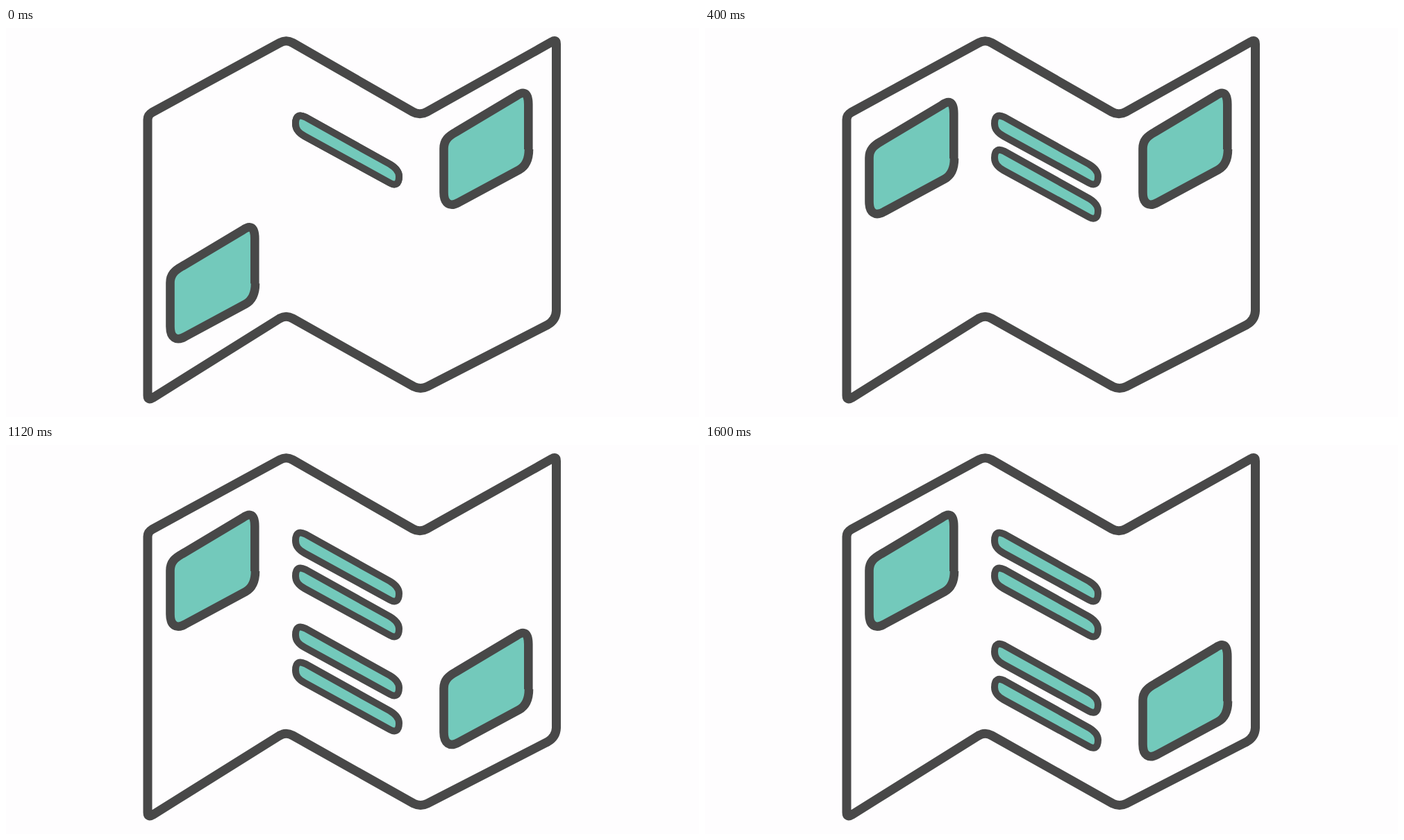
Recreate the animation shown at these times as an HTML page. Size 998 px wide and 561 px high, loop 2.04 s.

```html
<!DOCTYPE html>
<html lang="en">
<head>
<meta charset="utf-8">
<title>Folding leaflet</title>
<style>
  html, body { margin: 0; width: 100%; height: 100%; overflow: hidden; background: #fefdfe; }
  svg { display: block; width: 100vw; height: 100vh; }
</style>
</head>
<body>
<svg viewBox="0 0 998 561">
  <defs>
    <path id="card" stroke-width="12.6" d="M753 175C753 190 748 199.5 739 204.5L652 251.5C639 259 630.5 253 630.5 237V174C630.5 162 637 156 648 150L735 98C745 90.5 752.3 92 752.3 110V175"/>
    <path id="bar" stroke-width="10" d="M417 138C417 126 423 124.5 431 128.5L553 196.5C562 202 566 207 566 214C566 226 560 227.5 553 223.5L430 156C421 151 417 146 417 138Z"/>
  </defs>
  <path fill="none" stroke="#484848" stroke-width="13" d="M204 132Q204 125.5 210 122L394 21.5Q403.5 16 413 21.5L586 121Q596 126.5 606 121L786 20Q792.5 16 792.5 23V408Q792 421 780 428L607 517Q597 522 587 517L413 419Q403.5 413.5 394 419L212 533Q204 538 204 530Z"/>
  <g fill="#73c9bb" stroke="#484848">
    <use id="left" href="#card"/>
    <use id="right" href="#card"/>
    <g id="pair"><use class="second" href="#bar"/><use href="#bar"/></g>
    <use class="second" href="#bar"/>
    <use href="#bar"/>
  </g>
</svg>
<script>
const LOOP = 2040, STEP = 40;
const left = document.getElementById('left');
const right = document.getElementById('right');
const pair = document.getElementById('pair');
const seconds = document.querySelectorAll('.second');

// Timing curve cubic-bezier(1/3, 0, b, 1), solved by bisection.
function ease(x, b = 0) {
  if (x <= 0) return 0;
  if (x >= 1) return 1;
  let lo = 0, hi = 1;
  for (let i = 0; i < 30; i++) {
    const s = (lo + hi) / 2, r = 1 - s;
    if (s * r * r + 3 * b * s * s * r + s ** 3 < x) lo = s; else hi = s;
  }
  return lo * lo * (3 - 2 * lo);
}

const move = (t, start, span, from, to, b) =>
  from + (to - from) * ease((t - start) / span, b);

const place = (el, x, y) => el.setAttribute('transform', `translate(${x} ${y.toFixed(3)})`);

function draw(t) {
  place(left, -394, move(t, 0, 560, 193.5, 7));
  place(right, 0, move(t, 800, 560, 0, 194.5));
  const gap = move(t, 0, 560, 0, 51);
  seconds.forEach(el => place(el, 0, gap));
  place(pair, 0, move(t, 760, 560, 0, 145, 0.04) + move(t, 1220, 380, 0, 15.3));
  pair.style.display = t > 760 ? '' : 'none';
}

const begin = performance.now();
function tick() {
  const t = (performance.now() - begin) % LOOP;
  draw(Math.floor(t / STEP) * STEP);
  requestAnimationFrame(tick);
}
tick();
</script>
</body>
</html>
```
